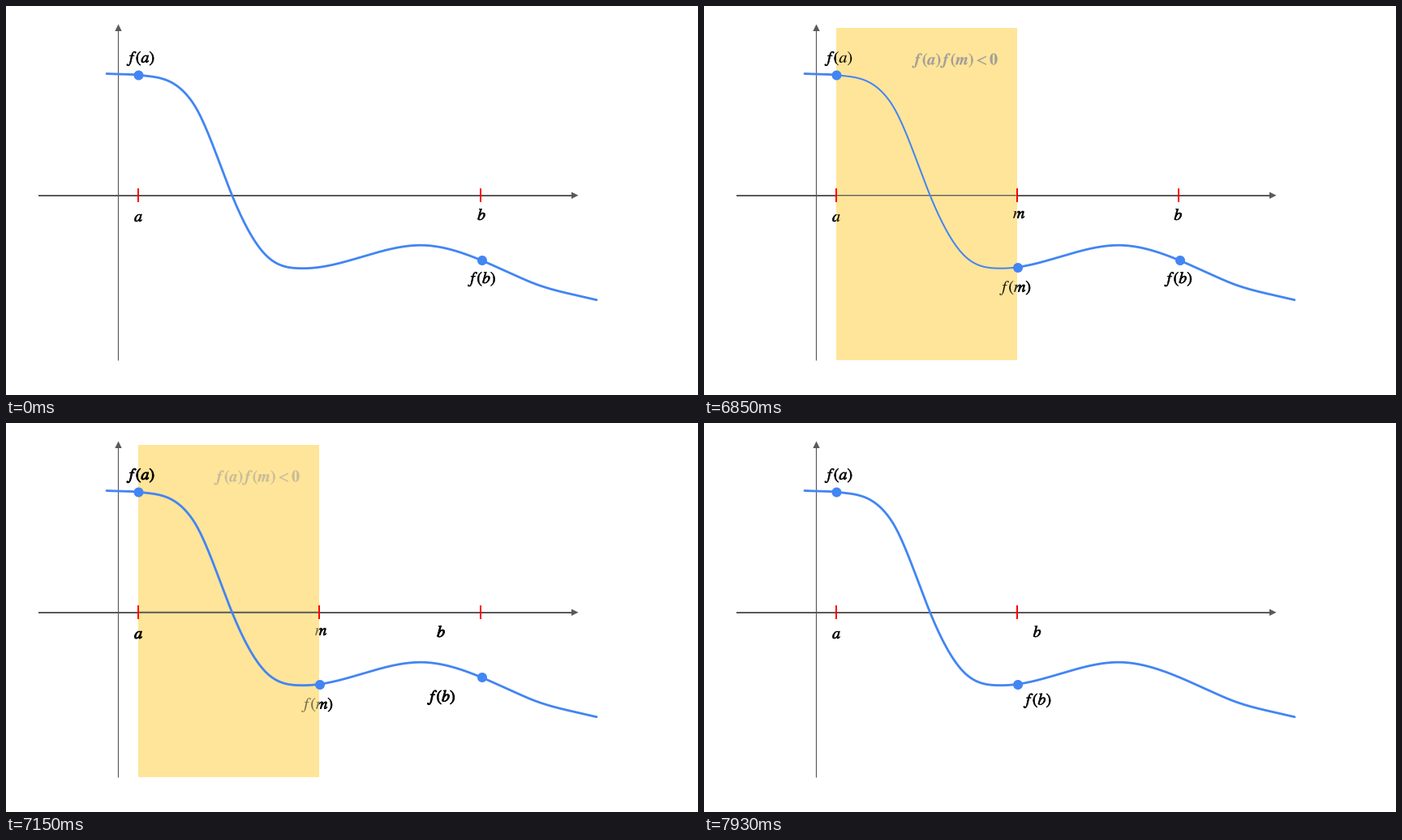
Recreate the animation shown at these times as a matplotlib script. Size 853x480 px, loop 7990 ms.

```python
import numpy as np
import matplotlib.pyplot as plt
from matplotlib.animation import FuncAnimation
from matplotlib.patches import Circle, PathPatch, Polygon, Rectangle
from matplotlib.path import Path
from matplotlib.textpath import TextPath

plt.rcParams["mathtext.fontset"] = "stix"

W, H, DPI = 853, 480, 64
PX = 72 / DPI
LOOP, INTERVAL, STEP = 7990, 10, 60
SHOW_MID, SHOW_BOX, MORPH = 500, 3640, 6850
BLUE, GRAY, RED = "#4285f4", "#595959", "#ff0000"
YELLOW = np.array([255, 229, 153]) / 255
A, MID, B = 163, 386, 585
TOP, AXIS, BOTTOM = 27, 233.9, 437
HEAVY, THIN = 0.65, 0.1

fig = plt.figure(figsize=(W / DPI, H / DPI), dpi=DPI, facecolor="white")
ax = fig.add_axes([0, 0, 1, 1])
ax.set(xlim=(0, W), ylim=(H, 0))
ax.axis("off")


def line(x, y, color, width, z, **style):
    return ax.plot(x, y, color=color, lw=width * PX, zorder=z,
                   **{"solid_capstyle": "butt", **style})[0]


def label(tex, cx, baseline, size=20, z=1, color="black", width=HEAVY):
    """Outline of a formula, its ink centred on cx."""
    raw = TextPath((0, 0), f"${tex}$", size=size)
    box = raw.get_extents()
    verts = raw.vertices * [1, -1] + [cx - (box.x0 + box.x1) / 2, baseline]
    return ax.add_patch(PathPatch(Path(verts, raw.codes), fc=color, ec=color,
                                  lw=width * PX, zorder=z))


def dot(x, y):
    return ax.add_patch(Circle((x, y), 6, fc=BLUE, ec="none", zorder=5))


def tick(x):
    return line([x, x], [225, 242], RED, 2, 4)


def arrow_head(x, y, dx, dy, length=8.5, half=4.2):
    tip, along = np.array([x, y]), np.array([dx, dy])
    base, side = tip - length * along, half * along[::-1]
    ax.add_patch(Polygon([tip, base + side, base - side], fc=GRAY, ec="none",
                         zorder=1))


def graph(x):
    """Hermite curve through key points given as x, height and slope."""
    px, py, slope = np.array([
        (124, 83.5, 0.06), (163, 85.2, 0.12), (230, 119, 1.45),
        (279, 234.5, 2.45), (318, 305, 1.1), (367, 323.7, 0),
        (511, 295.2, 0), (645, 340, 0.42), (728, 362.7, 0.25)]).T
    i = np.clip(np.searchsorted(px, x) - 1, 0, len(px) - 2)
    h = px[i + 1] - px[i]
    u = (x - px[i]) / h
    v = 1 - u
    return (v * v * ((1 + 2 * u) * py[i] + u * h * slope[i])
            + u * u * ((1 + 2 * v) * py[i + 1] - v * h * slope[i + 1]))


# Axes and graph
line([138.5, 138.5], [28, BOTTOM], GRAY, 1.2, 1)
line([40, 700], [AXIS, AXIS], GRAY, 2, 1)
arrow_head(138.5, 22.5, 0, -1)
arrow_head(705.5, 233.7, 1, 0)
curve_x = np.linspace(124, 728, 400)
curve_y = graph(curve_x)
line(curve_x, curve_y, BLUE, 2.8, 1.5, solid_capstyle="round")

# Marks on the graph
tick(A)
mid_tick, b_tick = tick(MID), tick(B)
dot(163.5, 85.5)
mid_dot, b_dot = dot(387, 323), dot(587, 314)

A_LABELS = [(r"f\,(a)", 165.5, 69.7), ("a", 163, 266)]
MID_LABELS = [(r"f\,(m)", 383.2, 352.7), ("m", 388, 262)]
B_LABELS = [(r"f\,(b)", 586, 342), ("b", 586, 264)]
a_texts = [label(*spec) for spec in A_LABELS]
mid_texts = [label(*spec) for spec in MID_LABELS]
b_texts = [label(*spec) for spec in B_LABELS]
b_homes = [text.get_path() for text in b_texts]

# Highlighted interval, with finer copies of everything inside it
box = ax.add_patch(Rectangle((A, TOP), MID - A, BOTTOM - TOP,
                             fc=YELLOW, ec="none", zorder=2))
in_axis = line([A, MID], [AXIS - 0.15] * 2, GRAY, 1.33, 3, snap=False)
in_curve = line(curve_x, curve_y, BLUE, 2, 3.5)
in_a = [label(*spec, z=3, width=THIN) for spec in A_LABELS]
in_mid = [label(*spec, z=3, width=THIN) for spec in MID_LABELS]
call = r"\mathbfit{f}\,\mathbf{(}\mathbfit{%s}\mathbf{)}"
product = label(call % "a" + r"\," + call % "m" + r"<\mathbf{0}", 309, 72.3,
                z=3, color="#999999", width=0.2)
for artist in [in_curve, *in_a, *in_mid]:
    artist.set_clip_path(box)


def show(artists, visible):
    for artist in artists:
        artist.set_visible(bool(visible))


def travel(step, total=18.6, ramp=3.3):
    """Share of the way covered: even speed with a soft start and stop."""
    step = min(step, total)
    if step > total / 2:
        return 1 - travel(total - step, total, ramp)
    done = step * step / (2 * ramp) if step < ramp else step - ramp / 2
    return done / (total - ramp)


def over_yellow(shade, alpha):
    return alpha * shade + (1 - alpha) * YELLOW


def update(frame):
    t = frame * INTERVAL
    step = (t - MORPH) // STEP + 1 if t >= MORPH else 0
    alpha = max(0, 1 - step / 13)
    # A layer vanishes once it is less than half opaque; text over the
    # box counts both layers and so lasts longer.
    solid = alpha > 0.5
    solid_pair = 1 - (1 - alpha) ** 2 > 0.5
    boxed = t >= SHOW_BOX and solid

    show([mid_tick, mid_dot], t >= SHOW_MID)
    show(mid_texts, t >= SHOW_MID and solid)
    show([b_tick, b_dot], solid)
    show([box, in_axis, in_curve, *in_a], boxed)
    show([product, *in_mid], t >= SHOW_BOX and solid_pair)

    grow = np.clip((step - 1) / 5, 0, 1)
    in_curve.set_linewidth((2 + 0.8 * grow) * PX)
    in_axis.set_linewidth((1.33 + 0.67 * grow) * PX)
    bold = HEAVY + (0.3 if 4 <= step < 14 else 0)
    for text in a_texts + b_texts:
        text.set_linewidth(bold * PX)
    for text in in_a:
        text.set_linewidth((THIN + (bold - THIN) * grow) * PX)
    for text in in_mid:
        text.set_color(over_yellow(0, alpha))
    product.set_color(over_yellow(0.6, alpha))

    way = travel(step)
    for text, home, drop in zip(b_texts, b_homes, (5.5, 0)):
        text.set_path(Path(home.vertices + [-175.5 * way, drop * way],
                           home.codes))
    return []


anim = FuncAnimation(fig, update, frames=LOOP // INTERVAL, interval=INTERVAL,
                     repeat=True, repeat_delay=0, cache_frame_data=False,
                     init_func=lambda: update(0))
plt.show()
```
